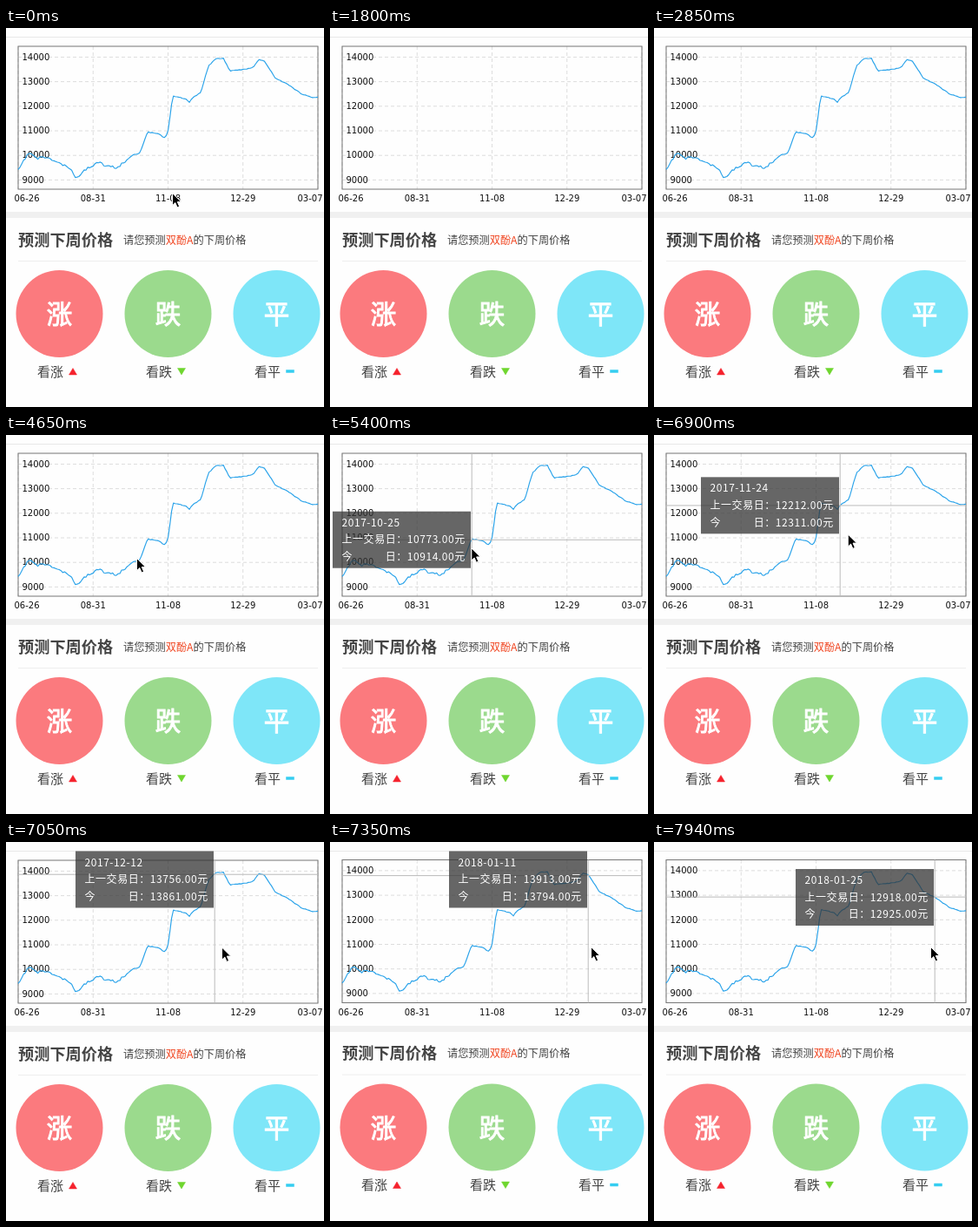
These frames come from a looping animation (366 by 435 pixels, 8 s). An HTML page:

```html
<!DOCTYPE html>
<html lang="zh-CN">
<head>
<meta charset="utf-8">
<title>价格预测</title>
<style>
html, body { margin: 0; width: 100%; height: 100%; overflow: hidden; background: #fefefe; }
svg { display: block; width: 100%; height: 100%; font-family: "Noto Sans CJK SC", "Noto Sans CJK", sans-serif; fill: #444; }
.axis { font: 10px "DejaVu Sans", sans-serif; fill: #111; }
.grid { stroke: #ddd; stroke-dasharray: 4 3; }
.mid { text-anchor: middle; }
.big { font-size: 29.5px; fill: #fff; stroke: #fff; }
#tip text { font: 12px "Noto Sans CJK TC", "Noto Sans CJK", sans-serif; letter-spacing: .55px; fill: #fff; white-space: pre; }
</style>
</head>
<body>
<svg viewBox="0 0 366 435">
  <path d="M0 10.5H366" stroke="#e8e8e8"/>
  <rect y="211" width="366" height="7" fill="#f0f0f0"/>
  <g id="page">
    <g id="grid"></g>
    <rect x="14" y="21" width="345" height="164" fill="none" stroke="#777"/>
    <g id="labels" class="axis"></g>
    <clipPath id="reveal"><rect id="wipe" x="13" y="20" height="166"/></clipPath>
    <path id="price" clip-path="url(#reveal)" fill="none" stroke="#2aa3ea" stroke-width="1.15" stroke-linejoin="round"/>
    <path id="cross" stroke="#bbb"/>
    <text x="14" y="249.5" font-size="18.2" font-weight="700">预测下周价格</text>
    <text x="135" y="247.5" font-size="12.2">请您预测<tspan fill="#f0441f">双酚A</tspan>的下周价格</text>
    <path d="M14 267.5H359" stroke="#eee"/>
    <g id="choices"></g>
  </g>
  <g id="tip">
    <rect width="159" height="65" fill="#323232" fill-opacity=".74"/>
    <text x="10.5" y="17"></text>
    <text x="10.5" y="36.6"></text>
    <text x="10.5" y="56.2"></text>
  </g>
  <path id="cursor" d="M0 0V14.2L3.3 11.1L5.6 16.4L8.1 15.3L5.8 10.1H10.2Z" fill="#000" stroke="#fff"/>
</svg>
<script>
const LOOP = 8000, STEP = 149.8, LEFT = 14, RIGHT = 359, TOP = 21, BOTTOM = 185;
const $ = id => document.getElementById(id);

function add(parent, tag, attrs, text = '') {
  const node = document.createElementNS('http://www.w3.org/2000/svg', tag);
  for (const key in attrs) node.setAttribute(key, attrs[key]);
  node.textContent = text;
  parent.append(node);
}

// Linear interpolation of one column between rows keyed by their first value
function at(rows, key, col = 1) {
  const next = rows.findIndex(row => row[0] > key);
  if (next < 0) return rows.at(-1)[col];
  const a = rows[Math.max(0, next - 1)], b = rows[next];
  const p = Math.max(0, (key - a[0]) / (b[0] - a[0]));
  return a[col] + (b[col] - a[col]) * p;
}

function random(seed) {
  return () => (seed = seed * 16807 % 2147483647) / 2147483647;
}

const priceY = v => 33 + (14000 - v) * 0.0282;
const priceAt = x => 14000 - (at(points, x) - 33) / 0.0282;

// Turning points of the price line, roughened by small daily moves
const trend = `14 163, 25 144, 28 143, 36 150, 42 147, 56 152, 74 161, 79 170, 84 171, 88 164, 109 152,
  113 157, 128 160, 146 145, 154 143, 163 119, 176 121, 182 126, 186 121, 192 77, 207 81, 211 85, 215 79,
  224 74, 233 43, 241 35, 250 34, 258 49, 273 47, 284 45, 291 36, 297 37, 310 57, 324 64, 340 75, 351 79, 359 79`
  .split(',').map(pair => pair.trim().split(' ').map(Number));
const rnd = random(11), days = 168, points = [];
for (let i = 0; i <= days; i++) {
  const x = LEFT + i / days * (RIGHT - LEFT);
  const rough = x < 140 ? 2.4 : 0.9;
  points.push([x, at(trend, x) + (rnd() - 0.5) * rough]);
}
$('price').setAttribute('d', 'M' + points.map(([x, y]) => `${x.toFixed(1)} ${(y + 0.5).toFixed(1)}`).join('L'));

for (let v = 9000; v <= 14000; v += 1000) {
  const y = priceY(v);
  add($('grid'), 'path', { class: 'grid', d: `M${LEFT} ${y + 0.4}H${RIGHT}` });
  add($('labels'), 'text', { x: 18.5, y: y + 3.6 }, v);
}
['06-26', '08-31', '11-08', '12-29', '03-07'].forEach((day, i) => {
  const x = LEFT + i * 86.25;
  add($('grid'), 'path', { class: 'grid', d: `M${x} ${TOP}V${BOTTOM}` });
  add($('labels'), 'text', { class: 'mid', x: Math.min(350, Math.max(24, x)), y: 199 }, day);
});

[
  ['涨', '#fb7a7e', '#f5222d', 'M72.5 398L77 390.5L81.5 398Z'],
  ['跌', '#9bda8d', '#6fd62f', 'M72.5 390.5L77 398L81.5 390.5Z'],
  ['平', '#7ee6f8', '#35cdf0', 'M72.5 392.5H81.5V395.5H72.5Z']
].forEach(([word, fill, mark, d], i) => {
  const dx = i * 125, box = $('choices');
  add(box, 'circle', { cx: 61.5 + dx, cy: 328, r: 50, fill });
  add(box, 'text', { class: 'mid big', x: 61.5 + dx, y: 339 }, word);
  add(box, 'text', { x: 36 + dx, y: 399.5, 'font-size': 15 }, '看' + word);
  add(box, 'path', {
    d, fill: mark, stroke: mark, 'stroke-width': 0.5, 'stroke-linejoin': 'round', transform: `translate(${dx})`
  });
});

// Pointer paths: time, x, y
const leave = [[150, 191.5, 189.5], [600, 236, 41]];
const drag = [
  [3900, 205, 50], [4350, 160, 182], [4650, 150.5, 141.5], [5100, 150.5, 141.5], [6000, 187.5, 106.5],
  [6150, 187.5, 106.5], [6450, 200, 104], [6750, 198, 107], [7050, 248.5, 121], [7350, 300.5, 120.5],
  [7650, 330, 120.5], [7950, 318.5, 120.5]
];
// Crosshair: time, x
const snap = [[4800, 150], [5100, 150], [6000, 188], [6750, 188], [7050, 240], [7350, 297], [7950, 323]];
// Known trading days: x, date, previous price, price
const quotes = [
  [150, '2017-10-18', 10082, 10104],
  [188, '2017-11-09', 10902, 11750],
  [240, '2017-12-12', 13756, 13861],
  [297, '2018-01-11', 13913, 13794],
  [323, '2018-01-25', 12918, 12925]
];
const dates = quotes.map(([x, day]) => [x, Date.parse(day)]);

function quoteAt(x) {
  const known = quotes.find(q => q[0] === x);
  if (known) return known.slice(1);
  const date = new Date(at(dates, x));
  const weekend = { 6: 1, 0: 2 }[date.getUTCDay()] || 0;
  date.setUTCDate(date.getUTCDate() - weekend);
  return [date.toISOString().slice(0, 10), Math.round(priceAt(x - 2)), Math.round(priceAt(x))];
}

const lines = document.querySelectorAll('#tip text');
const show = (node, on) => node.setAttribute('visibility', on ? 'visible' : 'hidden');
const move = (node, x, y) => node.setAttribute('transform', `translate(${x} ${y})`);

function drawTip(clock) {
  const x = Math.round(at(snap, clock));
  const [day, before, now] = quoteAt(x);
  const y = priceY(now);
  $('cross').setAttribute('d', `M${x + 0.2} ${TOP}V${BOTTOM}M${LEFT} ${y + 0.3}H${RIGHT}`);
  move($('tip'), Math.max(0, x - 160), Math.max(10.5, y - 32.3));
  lines[0].textContent = day;
  lines[1].textContent = `上一交易日：${before.toFixed(2)}元`;
  lines[2].textContent = `今\u3000\u3000\u3000日：${now.toFixed(2)}元`;
}

function draw(t) {
  const clock = Math.floor(t / STEP) * 150;
  const path = clock < 3900 ? leave : drag;
  show($('cursor'), clock < 750 || clock >= 3900);
  move($('cursor'), at(path, clock, 1), at(path, clock, 2));

  const touched = clock >= 4800;
  show($('tip'), touched);
  show($('cross'), touched);
  if (touched) drawTip(clock);

  const shown = clock < 1800 ? 1 : Math.min(1, (clock - 1800) / 911);
  $('wipe').setAttribute('width', shown && 1 + shown * (RIGHT - LEFT + 1));
  move($('page'), 0, clock >= 7200 ? -0.5 : 0);
}

let start;
function tick(ms) {
  start ??= ms;
  draw((ms - start) % LOOP);
  requestAnimationFrame(tick);
}
draw(0);
requestAnimationFrame(tick);
</script>
</body>
</html>
```
